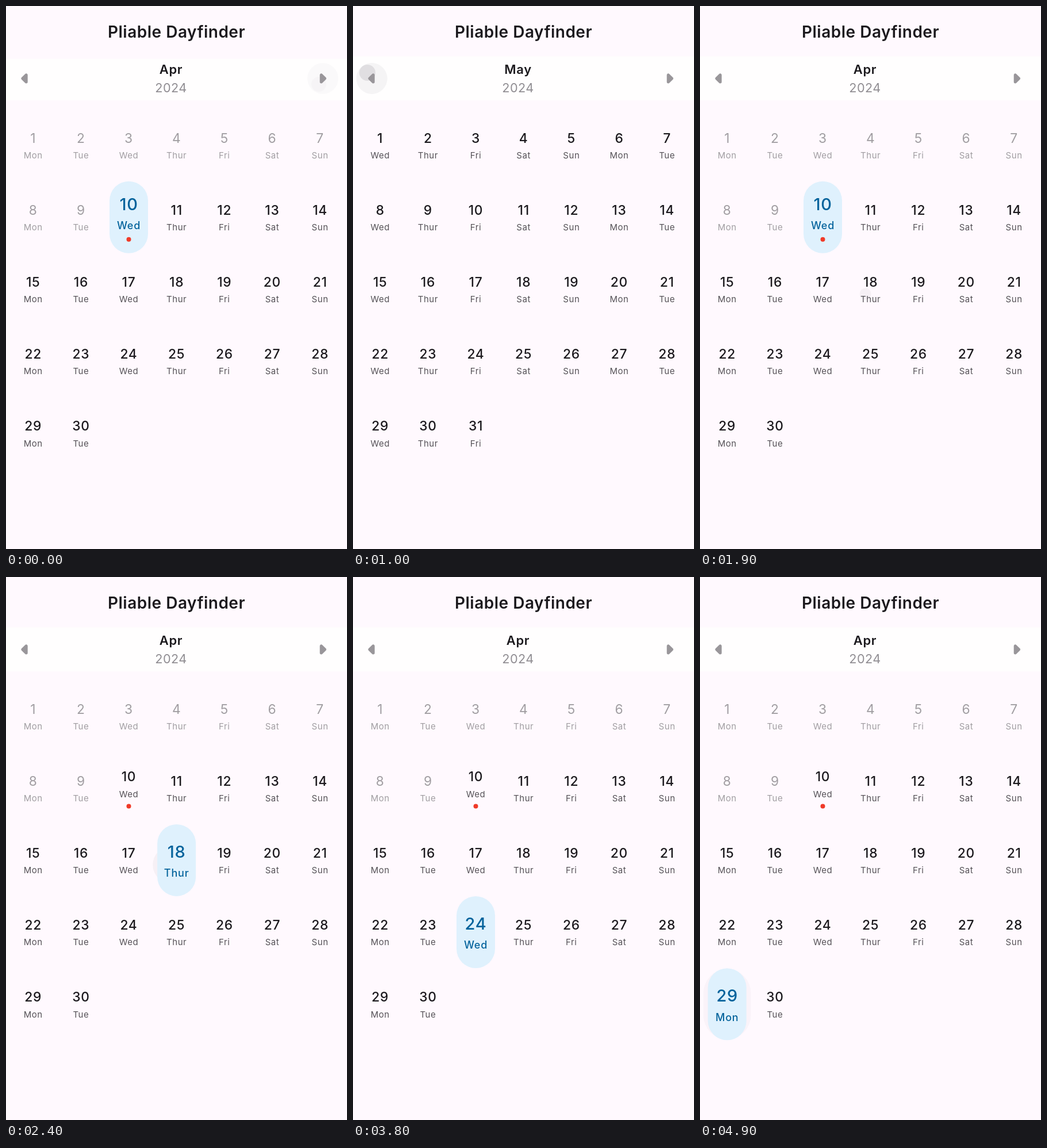
These frames come from a looping animation (593x944 px, 5.1 s). An HTML page with a canvas:

```html
<!DOCTYPE html>
<html lang="en">
<head>
<meta charset="utf-8">
<title>Calendar</title>
<style>
  html, body { margin: 0; width: 100%; height: 100%; overflow: hidden; background: #fff9fe; }
  canvas { display: block; width: 593px; height: 944px; }
</style>
</head>
<body>
<canvas id="stage" width="593" height="944"></canvas>
<script>
const ctx = document.getElementById('stage').getContext('2d');
const LOOP = 5100, STEP = 100;
const WEEK = ['Mon', 'Tue', 'Wed', 'Thur', 'Fri', 'Sat', 'Sun'];
const INK = '#1c1a1e', LABEL = '#555257', MUTED = '#a19ea2';
const BLUE = '#04639c', PILL = '#dff1fd', RED = '#f03a28';
const TODAY = 10;

// Each tap is held from `down` until `pick`; dx, dy give the touch point in the cell.
const taps = [
  { day: 18, down: 1900, pick: 2400, dx: -9, dy: 8 },
  { day: 17, down: 2800, pick: 3100, dx: 0, dy: 0 },
  { day: 24, down: 3500, pick: 3500, dx: 0, dy: 0 },
  { day: 30, down: 4200, pick: 4400, dx: 0, dy: 0 },
  { day: 29, down: 4700, pick: 4900, dx: 0, dy: 0 }
];

const cellX = day => 47.2 + (day - 1) % 7 * 83.15;
const cellY = day => 242.1 + Math.floor((day - 1) / 7) * 125.15;
const shade = a => `rgba(40, 25, 45, ${a})`;

function text(str, x, y, size, weight, color, spacing = 0.7) {
  ctx.font = `${weight} ${size}px Inter, "Open Sans", sans-serif`;
  ctx.letterSpacing = spacing + 'px';
  ctx.textAlign = 'center';
  ctx.fillStyle = color;
  ctx.fillText(str, x, y + size * 0.364);
}

function disc(x, y, r, color) {
  ctx.fillStyle = color;
  ctx.beginPath();
  ctx.arc(x, y, r, 0, Math.PI * 2);
  ctx.fill();
}

function roundBox(x, y, w, h) {
  ctx.beginPath();
  ctx.roundRect(x - w / 2, y - h / 2, w, h, w / 2);
}

function arrow(x, dir) {
  ctx.fillStyle = ctx.strokeStyle = '#99969a';
  ctx.lineWidth = 5;
  ctx.lineJoin = 'round';
  ctx.beginPath();
  ctx.moveTo(x + 3.2 * dir, 126);
  ctx.lineTo(x - 3.2 * dir, 119.9);
  ctx.lineTo(x - 3.2 * dir, 132.1);
  ctx.closePath();
  ctx.fill();
  ctx.stroke();
}

function buttonInk(t) {
  if (t < 400) {
    disc(551, 126, 27, shade(0.02));
    if (t < 100) disc(544, 136, 13, shade(0.02));
  } else if (t >= 1000 && t < 1400) {
    disc(32.7, 126, 27, shade(0.045));
    if (t < 1100) disc(25, 116, 14, shade(0.1));
  }
}

function header(t, may) {
  text('Pliable Dayfinder', 296.5, 44.8, 28, 600, INK, 0.5);
  const top = t < 100 ? 92 : 87.5;
  ctx.fillStyle = '#fffefe';
  ctx.fillRect(0, top, 593, 164 - top);
  buttonInk(t);
  arrow(32, -1);
  arrow(551.4, 1);
  text(may ? 'May' : 'Apr', 287, 110.3, 22, 600, INK);
  text('2024', 287, 142, 21.7, 400, '#918e93', 0.4);
}

function cellInk(tap, t) {
  if (t < tap.down || t >= tap.pick + 300) return;
  const x = cellX(tap.day), y = cellY(tap.day);
  const fade = Math.min(1, 1 - (t - tap.pick) / 300);
  const held = Math.min(t, tap.pick) - tap.down;
  const long = tap.pick - tap.down > 400;
  ctx.save();
  roundBox(x, y, 83, 122);
  ctx.clip();
  if (!long) {
    ctx.fillStyle = shade(0.022 * fade);
    ctx.fill();
  }
  disc(x + tap.dx, y + tap.dy, 10 + held * (long ? 0.045 : 0.09), shade(0.04 * fade));
  ctx.restore();
}

function cell(day, may, chosen) {
  const x = cellX(day), y = cellY(day);
  const name = WEEK[(day - 1 + (may ? 2 : 0)) % 7];
  const dot = !may && day === TODAY;
  const past = !may && day < TODAY;
  if (chosen) {
    roundBox(x, y, 67, 125);
    ctx.fillStyle = PILL;
    ctx.fill();
    text(day, x, y - (dot ? 23.2 : 15.2), 29, 500, BLUE);
    text(name, x, y + (dot ? 14.3 : 22.3), 18, 500, BLUE, 0.8);
  } else {
    const lift = dot ? 7.5 : 0;
    text(day, x, y - 12.7 - lift, 22.8, past ? 400 : 500, past ? MUTED : INK);
    text(name, x, y + 17.4 - lift, 15, 400, past ? MUTED : LABEL, 0.55);
  }
  if (dot) disc(x, y + (chosen ? 38.6 : 31.3), 4, RED);
}

function draw(now) {
  const t = Math.floor(now % LOOP / STEP) * STEP;
  const may = t >= 100 && t < 1100;
  const chosen = taps.reduce((day, tap) => t >= tap.pick ? tap.day : day, TODAY);
  ctx.fillStyle = '#fff9fe';
  ctx.fillRect(0, 0, 593, 944);
  header(t, may);
  taps.forEach(tap => cellInk(tap, t));
  for (let day = 1; day <= (may ? 31 : 30); day++) cell(day, may, !may && day === chosen);
}

let start;
function tick(now) {
  start ??= now;
  draw(now - start);
  requestAnimationFrame(tick);
}
draw(0);
requestAnimationFrame(tick);
</script>
</body>
</html>
```
